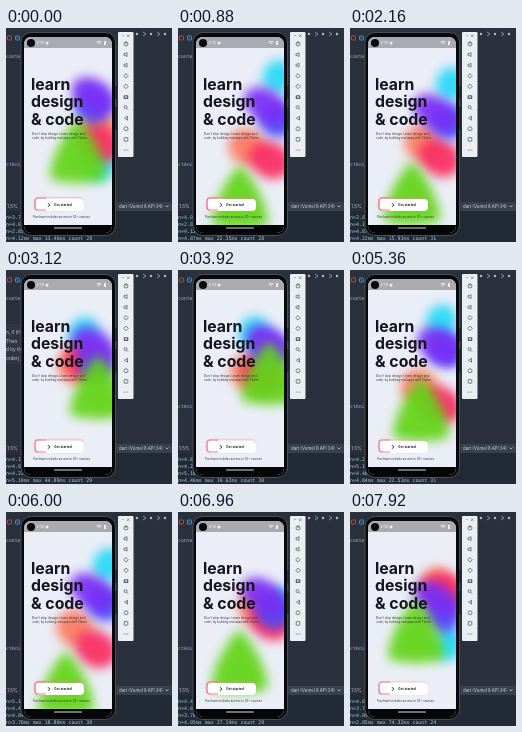
Recreate the animation shown at these times as an HTML page with a canvas. Size 166 by 214 pixels, loop 8000 ms.

```html
<!DOCTYPE html>
<html lang="en">
<head>
<meta charset="utf-8">
<style>
html, body { margin: 0; width: 100%; height: 100%; overflow: hidden; background: #2a313c; }
canvas { display: block; width: 166px; height: 214px; }
</style>
</head>
<body>
<canvas id="stage"></canvas>
<script>
const W = 166, H = 214, LOOP = 8000, STEP = 80;
const canvas = document.getElementById('stage');
const ctx = canvas.getContext('2d');
const dpr = window.devicePixelRatio || 1;
canvas.width = W * dpr;
canvas.height = H * dpr;

const SANS = 'Inter, Roboto, sans-serif';
const MONO = '"DejaVu Sans Mono", monospace';
const KEYS = [0, 880, 2160, 3120, 4720, 6000, 7920];

// Each path holds x, y pairs, one per key time.
const BLOBS = [
  { color: '#25d9f6', rx: 15, ry: 17, tilt: 0.3,
    path: [94,136, 100,49, 101,56, 78,64, 80,60, 102,53, 98,132] },
  { color: '#fb7c60', rx: 19, ry: 18, tilt: 0.8,
    path: [92,100, 69,119, 73,115, 70,96, 72,112, 69,116, 88,74] },
  { color: '#f92d62', rx: 22, ry: 18, tilt: 0.5,
    path: [93,116, 92,132, 90,130, 80,92, 90,122, 90,137, 95,80] },
  { color: '#4a4cf6', rx: 18, ry: 17, tilt: 0.8,
    path: [86,78, 99,92, 99,94, 90,94, 92,70, 99,92, 92,104] },
  { color: '#7a2ff5', rx: 24, ry: 16, tilt: 0.6,
    path: [88,68, 88,78, 85,85, 88,76, 92,74, 86,80, 86,88] },
  { color: '#62d417', rx: 23, ry: 25, drop: true,
    path: [72,126, 62,172, 62,168, 92,120, 84,106, 60,174, 66,122] }
];

const LOG = [
  [4.12, 13.40, 28], [4.87, 22.35, 28], [4.22, 15.93, 31],
  [5.10, 44.89, 29], [4.46, 19.62, 30], [4.84, 22.51, 31],
  [3.70, 18.80, 30], [4.05, 27.14, 29], [2.85, 74.32, 24]
];

function box(x, y, w, h, r, fill, stroke, line = 1) {
  ctx.beginPath();
  ctx.roundRect(x, y, w, h, r);
  if (fill) { ctx.fillStyle = fill; ctx.fill(); }
  if (stroke) { ctx.strokeStyle = stroke; ctx.lineWidth = line; ctx.stroke(); }
}

function dot(x, y, r, fill) {
  box(x - r, y - r, r * 2, r * 2, r, fill);
}

function label(str, x, y, font, color) {
  ctx.font = font;
  ctx.fillStyle = color;
  ctx.fillText(str, x, y);
}

function strokePath(points, color, line = 1) {
  ctx.beginPath();
  points.forEach(([x, y], i) => i ? ctx.lineTo(x, y) : ctx.moveTo(x, y));
  ctx.strokeStyle = color;
  ctx.lineWidth = line;
  ctx.stroke();
}

function spline(path, axis, t) {
  let i = 0;
  while (i < KEYS.length - 2 && t >= KEYS[i + 1]) i++;
  const at = k => path[Math.max(0, Math.min(KEYS.length - 1, k)) * 2 + axis];
  const u = Math.min(1, (t - KEYS[i]) / (KEYS[i + 1] - KEYS[i]));
  const a = at(i - 1), b = at(i), c = at(i + 1), d = at(i + 2);
  return b + 0.5 * u * (c - a + u * (2 * a - 5 * b + 4 * c - d + u * (3 * (b - c) + d - a)));
}

function drawEditor(t) {
  box(0, 0, W, H, 0, '#2a313c');
  box(0, 183, W, 31, 0, '#222a35');

  box(1.5, 8, 4, 4, 0.5, null, '#a84a52');
  box(9.5, 8, 4, 4, 0.5, null, '#4d86c4');
  strokePath([[10.5, 9], [12.5, 11]], '#4d86c4', 0.7);
  label('conte', 0, 30, '4.8px ' + MONO, '#a7b2c6');

  if (t >= 2720 && t < 3600) {
    box(0, 54, 18, 40, 0, '#303744');
    ['n, if (H', 'Then', 'd by th', 'order).'].forEach((s, i) =>
      label(s, 0, 64 + i * 8.7, '4.7px ' + SANS, '#c3cad6'));
  } else {
    label('ctAni)', 0, 138, '4.8px ' + MONO, '#8fb4dc');
  }

  label('1.5%', 1, 179.5, '4.7px ' + SANS, '#bdc5d2');
  box(110, 174, 56, 9, 1, '#37404d');
  label('dart (Vumel 8 API 34)', 113, 180, '4.3px ' + SANS, '#d0d6df');
  strokePath([[159.5, 177.5], [161, 179], [162.5, 177.5]], '#c3cad5', 0.8);

  for (let i = 0; i < 5; i++) {
    const x = 130 + i * 7;
    if (i % 2) strokePath([[x, 4], [x + 3, 6], [x, 8]], '#8fa9c4', 0.8);
    else dot(x + 1, 6, 1.2, '#a9bdd2');
  }
}

function drawLog(t) {
  const now = Math.floor((t + 600) / 1000);
  for (let row = 0; row < 4; row++) {
    const k = (now - row + LOG.length) % LOG.length;
    const [mean, max, count] = LOG[k];
    label(`n=${mean.toFixed(2)}ms max ${max.toFixed(2)}ms count ${count}`,
      0, 212 - row * 7, '4.95px ' + MONO, '#a9cbe0');
  }
}

function drop(x, y, w, h) {
  ctx.moveTo(x, y - h * 1.4);
  ctx.bezierCurveTo(x + w * 0.5, y - h, x + w * 1.3, y + h * 0.3, x + w * 1.2, y + h);
  ctx.quadraticCurveTo(x, y + h * 1.3, x - w * 1.2, y + h);
  ctx.bezierCurveTo(x - w * 1.3, y + h * 0.3, x - w * 0.5, y - h, x, y - h * 1.4);
}

function drawBlobs(t) {
  ctx.save();
  ctx.filter = `blur(${5.5 * dpr}px)`;
  ctx.globalAlpha = 0.93;
  for (const b of BLOBS) {
    const x = spline(b.path, 0, t), y = spline(b.path, 1, t);
    ctx.fillStyle = b.color;
    ctx.beginPath();
    if (b.drop) drop(x, y, b.rx, b.ry);
    else ctx.ellipse(x, y, b.rx, b.ry, b.tilt, 0, Math.PI * 2);
    ctx.fill();
  }
  ctx.restore();
}

function drawButton(t) {
  const pulse = 0.5 - 0.5 * Math.cos((t - 300) * Math.PI * 2 / 1270);
  ctx.save();
  ctx.globalAlpha = 0.2 + 0.3 * pulse;
  box(28.5, 169.5, 49, 13, 4, null, '#f77f8f', 1.4);
  ctx.restore();
  box(30, 171, 48, 12, 4, '#fff');

  ctx.beginPath();
  ctx.moveTo(40, 170);
  ctx.lineTo(32, 170);
  ctx.quadraticCurveTo(29, 170, 29, 173);
  ctx.lineTo(29, 179);
  ctx.quadraticCurveTo(29, 182, 32, 182);
  ctx.lineTo(40, 182);
  ctx.strokeStyle = '#ef7f88';
  ctx.lineWidth = 1.2;
  ctx.stroke();

  strokePath([[42, 175.2], [43.8, 177], [42, 178.8]], '#15161f', 0.9);
  label('Get started', 48, 178.2, '600 3.3px ' + SANS, '#15161f');
}

function drawScreen(t) {
  ctx.save();
  ctx.beginPath();
  ctx.roundRect(18, 9, 88, 196, 7);
  ctx.clip();
  box(18, 9, 88, 196, 0, '#ebeef7');
  drawBlobs(t);

  box(18, 9, 88, 11, 0, '#a9abb0');
  dot(25, 15, 4, '#08090c');
  label('2:13', 30.5, 16.4, '500 3.8px ' + SANS, '#f0f1f3');
  dot(41, 15, 1.5, '#ebecef');
  strokePath([[91, 13.5], [95, 13.5], [93, 16], [91, 13.5]], '#eceef0', 0.8);
  box(98, 13, 2, 4, 0.5, '#eceef0');

  ['learn', 'design', '& code'].forEach((s, i) =>
    label(s, 25, 61.5 + i * 17.5, '700 15.8px ' + SANS, '#14151e'));
  label("Don't skip design. Learn design and", 26, 107, '3.15px ' + SANS, '#343640');
  label('code, by building real apps with Flutter.', 26, 111, '3px ' + SANS, '#343640');

  drawButton(t);
  label('Purchase includes access to 30+ courses', 27, 190.3, '2.9px ' + SANS, '#30323a');

  box(18, 197, 88, 8, 0, '#050608');
  box(48, 199.5, 28, 1, 0.5, '#d5d8dc');
  ctx.restore();
}

function drawPhone(t) {
  box(15, 4.5, 94.5, 203, 10, '#08090c', '#4b5058');
  box(109.5, 58, 1, 13, 0.5, '#11151c');
  box(109.5, 79, 1, 23, 0.5, '#11151c');
  drawScreen(t);
}

function drawToolbar() {
  const ink = '#59616c';
  const cx = 120, y = i => 16 + i * 10.6;
  const shape = (cy, pts) => strokePath(pts.map(([dx, dy]) => [cx + dx, cy + dy]), ink, 0.8);
  const speaker = [[-2, -1], [-0.5, -1], [1, -2], [1, 2], [-0.5, 1], [-2, 1], [-2, -1]];
  const diamond = [[0, -2.3], [2.3, 0], [0, 2.3], [-2.3, 0], [0, -2.3]];

  box(112, 4, 15.5, 125, 1, '#eceff2');
  strokePath([[116, 7.5], [118, 7.5]], '#929aa3', 0.7);
  strokePath([[121, 6.5], [123.5, 9]], ink, 0.6);
  strokePath([[123.5, 6.5], [121, 9]], ink, 0.6);

  box(118, y(0) - 2, 4, 4, 2, null, ink, 0.8);
  shape(y(0), [[0, -2.6], [0, 0]]);
  shape(y(1), speaker);
  shape(y(2), speaker);
  shape(y(3), diamond);
  shape(y(4), diamond);
  box(117.7, y(5) - 1.7, 4.6, 3.6, 0.7, ink);
  dot(cx, y(5), 0.9, '#eceff2');
  box(118, y(6) - 2, 3, 3, 1.5, null, ink, 0.8);
  shape(y(6), [[0.6, 0.6], [2.2, 2.2]]);
  shape(y(7), [[1.5, -2], [-1.5, 0], [1.5, 2], [1.5, -2]]);
  box(118, y(8) - 2, 4, 4, 2, null, ink, 0.8);
  box(118.2, y(9) - 1.8, 3.6, 3.6, 0.3, null, ink, 0.8);
  for (const dx of [-1.8, 0, 1.8]) dot(cx + dx, y(10), 0.5, ink);
}

function draw(now) {
  const t = Math.floor((now % LOOP) / STEP) * STEP;
  ctx.setTransform(dpr, 0, 0, dpr, 0, 0);
  drawEditor(t);
  drawLog(t);
  drawPhone(t);
  drawToolbar();
}

const start = performance.now();
function tick() {
  draw(performance.now() - start);
  requestAnimationFrame(tick);
}
tick();
</script>
</body>
</html>
```
